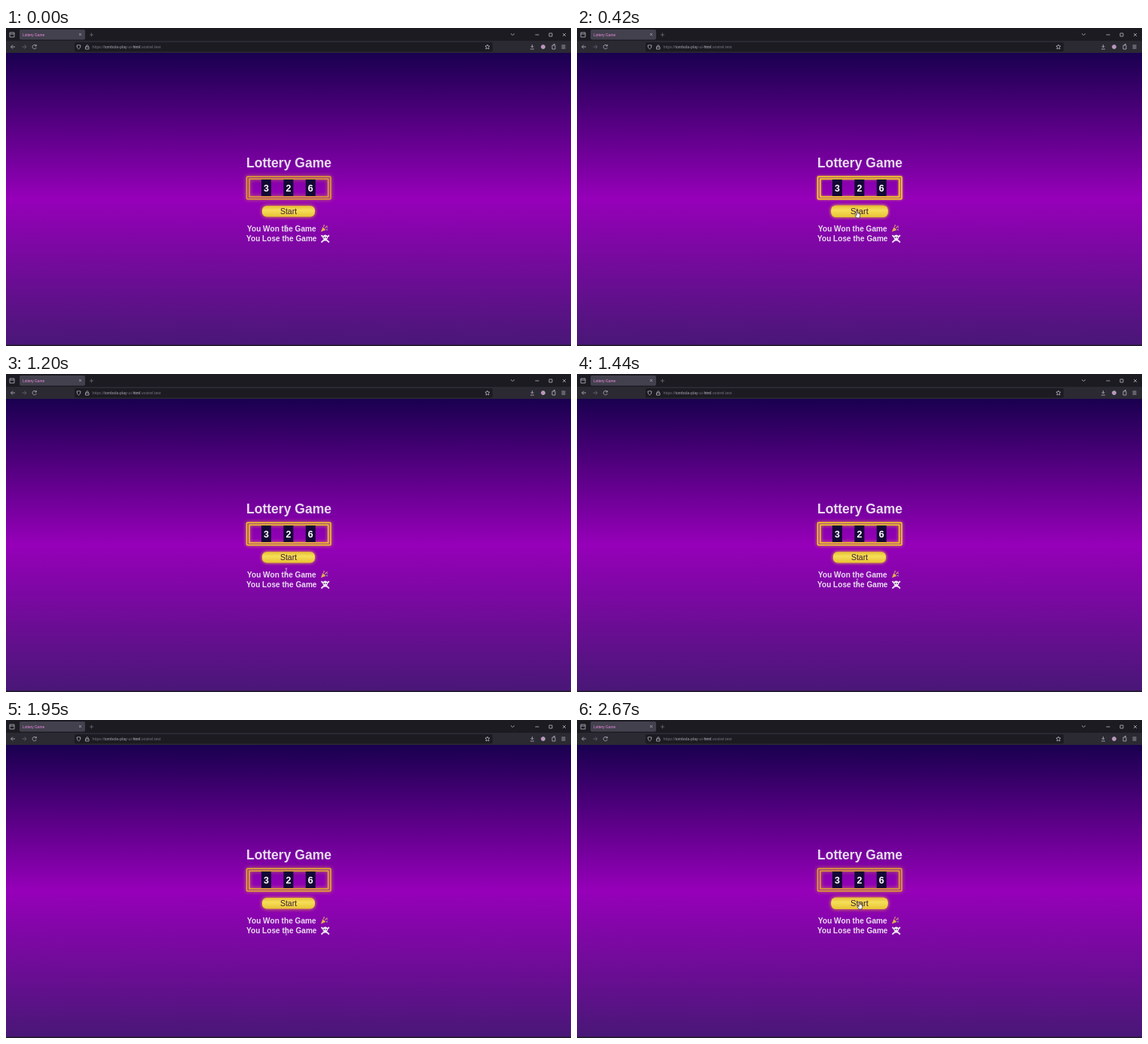
Write an HTML page that moves like this. It is 750 px wide and 422 px high and loops after 2700 ms.

```html
<!DOCTYPE html>
<html lang="en">
<head>
<meta charset="utf-8">
<title>Lottery Game</title>
<style>
  html, body { margin: 0; width: 100%; height: 100%; overflow: hidden; background: #1c1b22; }
  svg { display: block; width: 750px; height: 422px; font-family: "Liberation Sans", Arial, sans-serif; }
  .icon { fill: none; stroke: #aaa5b1; stroke-width: .9; }
  .dim { stroke: #67636e; }
  .bold { font-weight: bold; fill: #eadcf0; }
  .mid { text-anchor: middle; }
</style>
</head>
<body>
<svg viewBox="0 0 750 422">
  <defs>
    <linearGradient id="page" x2="0" y2="1">
      <stop offset="0" stop-color="#19004f"/>
      <stop offset=".5" stop-color="#9600b9"/>
      <stop offset="1" stop-color="#491777"/>
    </linearGradient>
    <linearGradient id="gold" x2="0" y2="1">
      <stop offset="0" stop-color="#e5bd35"/>
      <stop offset=".4" stop-color="#f6df58"/>
      <stop offset="1" stop-color="#e8c234"/>
    </linearGradient>
  </defs>

  <!-- browser window -->
  <rect width="750" height="422" fill="#1c1b22"/>
  <rect y="17" width="750" height="16" fill="#2b2a33"/>
  <rect x="18" y="2" width="87" height="13.5" rx="2" fill="#42414d"/>
  <rect x="91" y="19" width="555" height="12.5" rx="2" fill="#1c1b22"/>
  <text x="22" y="10.6" font-size="4.8" fill="#f08be0">Lottery Game</text>
  <text x="114.500" y="27" font-size="5.300" fill="#77737e">https://<tspan fill="#a9a4af">tombola-play</tspan>-ui-<tspan fill="#c5c0cb">html</tspan>.vostrel.test</text>
  <g class="icon">
    <path d="M5 6h6v6h-6zM5 8h6M97 7l3 3m0-3l-3 3"/>
    <path d="M12 25H6.500m2.500-2.500L6.500 25l2.500 2.500"/>
    <path d="M40 23.500a2.700 2.700 0 1 0 .3 2.500M40.300 22v2h-2"/>
    <path d="M94 23q2.500 0 2.500-1q0 1 2.500 1q0 4-2.500 5q-2.500-1-2.500-5zM105.500 25h4.500v3h-4.500zM106.500 25v-1.500q1.300-2 2.600 0V25"/>
    <path d="M639 22l1 2h2l-1.500 1.500.5 2.500-2-1.200-2 1.200.5-2.500L636 24h2z"/>
    <path d="M670 7.500l2.500 2 2.500-2M702.500 9h5M721 7h4v4h-4zM739 7l4 4m0-4l-4 4"/>
    <path d="M698.500 22v4m-2-2l2 2 2-2M696 28h5M725 23h4v5h-4zM727 23v-1.500h2M737.500 23h5m-5 2h5m-5 2h5"/>
    <circle cx="713" cy="25" r="2.500" fill="#c590c4"/>
    <path class="dim" d="M21.500 25H27m-2.500-2.500L27 25l-2.500 2.500M111 9h5M113.500 6.500v5"/>
  </g>

  <!-- page -->
  <rect y="33" width="750" height="387.500" fill="url(#page)"/>
  <text class="bold" x="319" y="185" font-size="17.550">Lottery Game</text>
  <g id="frame" fill="none" stroke-width="1.500">
    <rect x="319.500" y="197.300" width="111.500" height="29.700" rx="1"/>
    <rect x="323" y="200.300" width="104.700" height="23.700"/>
  </g>
  <g id="reels"></g>
  <g id="button">
    <rect x="340" y="236" width="70" height="14.500" rx="6" fill="url(#gold)"/>
    <text class="mid" x="375" y="247" font-size="10.500" fill="#3b2036">Start</text>
  </g>
  <g class="bold" font-size="10.100">
    <text x="320" y="269.500">You Won the Game</text>
    <text x="319" y="283.300">You Lose the Game</text>
  </g>
  <!-- party popper -->
  <path d="M418 270.500l2.500-6.500 4 4z" fill="#e2b04c"/>
  <path d="M421.500 264l1-3m1 4.500l3-3" stroke="#d98f7a" stroke-width="1.200"/>
  <path d="M425 267.500l2 .5M426 265h1" stroke="#8fc7b5" stroke-width="1.200"/>
  <!-- skull and crossbones -->
  <path d="M419 275.500l9.500 8.500m0-8.500l-9.500 8.500" stroke="#eee4f2" stroke-width="1.800" stroke-linecap="round"/>
  <path d="M420.500 278q0-3.500 3.300-3.500t3.300 3.500q0 2-1.500 2.500v2h-3.600v-2q-1.500-.5-1.500-2.500z" fill="#f2eaf5"/>
  <path d="M421.800 278h1.300m1.400 0h1.300" stroke="#301445" stroke-width="1.300"/>

  <!-- pointers, hotspot at 0,0 -->
  <path id="hand" d="M-.8 0h1.600v3.300l3 .8v3l-1 2.400h-3.600l-2.300-3.500 1-.8 1.300 1z" fill="#fff" stroke="#251b30" stroke-width=".7"/>
  <path id="beam" d="M-1.300-4h2.600M0-4v8M-1.300 4h2.600" stroke="#d5bfdd" stroke-width=".8"/>
  <path id="arrow" d="M0 0v7l1.700-1.500 1.300 2.700 1-.5-1.200-2.600H5z" fill="#fff" stroke="#251b30" stroke-width=".5"/>
</svg>
<script>
const LOOP = 2700, PULSE = 900;
const el = id => document.getElementById(id);
const frame = el('frame'), button = el('button');
const pointers = ['hand', 'beam', 'arrow'].map(el);

// time, x, y of the pointer
const path = [
  [0, 372, 266], [120, 372, 266], [330, 372, 242.500], [420, 372, 242.500],
  [810, 372, 241.500], [960, 372, 242], [1200, 372, 262], [1560, 372, 281],
  [2050, 372, 281], [2450, 374, 243], [2670, 375, 241.500], [LOOP, 375, 241.500]
];

el('reels').innerHTML = [3, 2, 6].map((digit, i) => {
  const x = 345.500 + i * 29.400;
  return `<rect x="${x - 6.500}" y="201" width="13" height="22" fill="#130835"/>
    <text class="bold mid" x="${x}" y="216.500" font-size="12.500" style="fill:#fff">${digit}</text>`;
}).join('');

const mix = (a, b, k) => a + (b - a) * k;
const smooth = (from, to, t) => {
  const k = Math.min(1, Math.max(0, (t - from) / (to - from)));
  return k * k * (3 - 2 * k);
};

function pointerAt(t) {
  const i = path.findIndex(p => p[0] > t);
  const a = path[i - 1], b = path[i], k = smooth(a[0], b[0], t);
  return [mix(a[1], b[1], k), mix(a[2], b[2], k)];
}

function draw(now) {
  const t = now % LOOP;
  const glow = (1 - Math.cos(t / PULSE * 2 * Math.PI)) / 2;
  const color = `rgb(${mix(226, 246, glow)},${mix(164, 210, glow)},${mix(48, 36, glow)})`;
  frame.setAttribute('stroke', color);
  frame.style.filter = `drop-shadow(0 0 ${mix(2.600, 1.800, glow)}px ${color})`;

  const hover = smooth(250, 390, t) - smooth(1040, 1160, t) + smooth(2350, 2500, t);
  button.setAttribute('transform', `translate(375 243.200) scale(${1 + .08 * hover}) translate(-375 -243.200)`);
  button.style.filter = `drop-shadow(0 0 ${mix(2.600, 2, glow)}px ${color})`;

  const [x, y] = pointerAt(t);
  const onText = (y > 260 && y < 271) || (y > 274 && y < 286);
  const shown = y < 251 ? 0 : onText ? 1 : 2;
  pointers.forEach((p, i) => {
    p.style.display = i === shown ? '' : 'none';
    p.setAttribute('transform', `translate(${x} ${y})`);
  });
  requestAnimationFrame(() => draw(performance.now() - start));
}

const start = performance.now();
draw(0);
</script>
</body>
</html>
```
